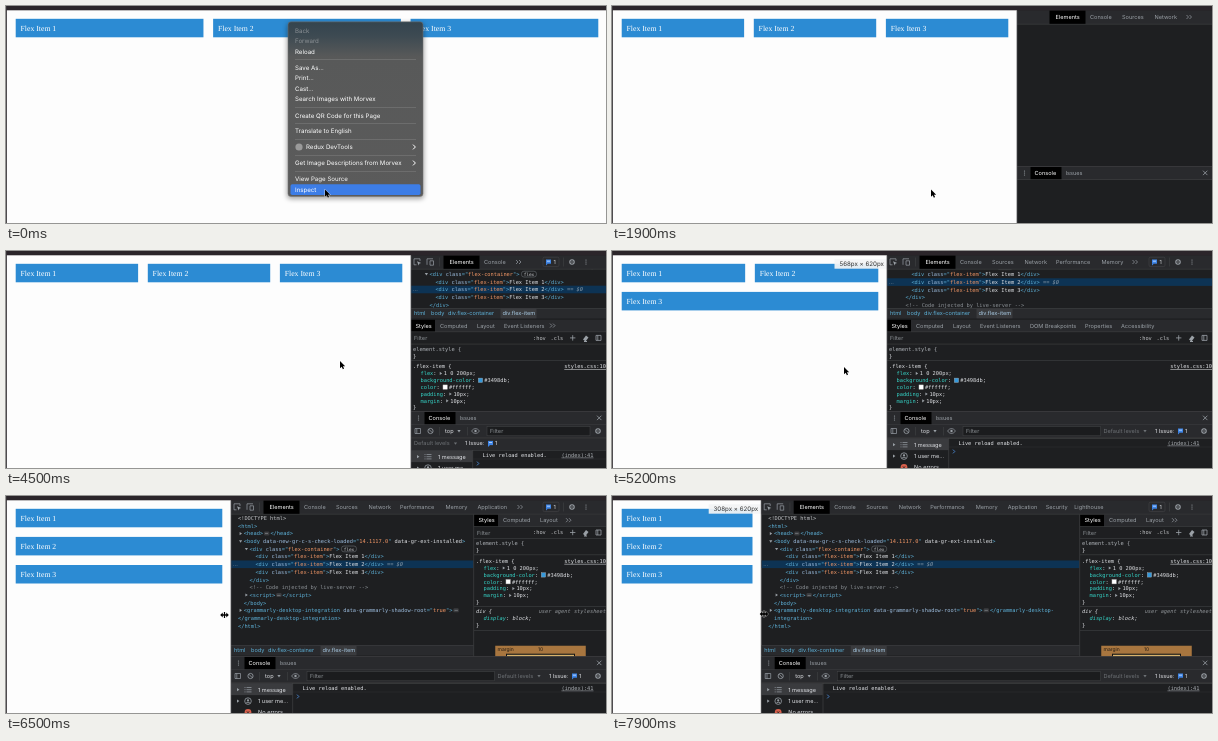
Animation of 600 by 217 pixels, one loop 8000 ms. Source, as an HTML page:

```html
<!DOCTYPE html>
<html lang="en">
<head>
<meta charset="utf-8">
<title>Flex items and developer tools</title>
<style>
html, body { margin: 0; width: 100%; height: 100%; overflow: hidden; background: #fdfdfd; }
svg { display: block; width: 100%; height: 100%; }
text { white-space: pre; text-rendering: geometricPrecision; }
.ui { font-family: Inter, Roboto, sans-serif; }
.mono { font-family: "DejaVu Sans Mono", "Liberation Mono", monospace; }
.page { font-family: "Liberation Serif", "Times New Roman", serif; }
</style>
</head>
<body>
<svg id="stage" viewBox="0 0 600 217"></svg>
<script>
const stage = document.getElementById('stage');
const LOOP = 8000, SCALE = 2.064, CHAR = 3.209;
const C = { bar: '#292a2d', body: '#1e1f21', line: '#454648', dim: '#9aa0a6', text: '#dfe1e5',
  tag: '#5db0d7', attr: '#9bbbdc', value: '#f29766', prop: '#35d4c7', blue: '#2c8bd3' };

// Drawing helpers; text is placed by its vertical centre.
const esc = s => s.replace(/&/g, '&amp;').replace(/</g, '&lt;');
const rect = (x, y, w, h, fill, more = '') =>
  `<rect x="${x}" y="${y}" width="${Math.max(0, w)}" height="${h}" fill="${fill}" ${more}/>`;
const path = (d, color, w = 0.7, more = '') =>
  `<path d="${d}" fill="none" stroke="${color}" stroke-width="${w}" ${more}/>`;
const circle = (x, y, r, fill, more = '') => `<circle cx="${x}" cy="${y}" r="${r}" fill="${fill}" ${more}/>`;
const rawText = (cls, size, x, y, inner, fill, more = '') =>
  `<text class="${cls}" x="${x}" y="${y + size * 0.35}" font-size="${size}" fill="${fill}" ${more}>${inner}</text>`;
const ui = (x, y, s, fill = C.dim, size = 5.6, more = '') => rawText('ui', size, x, y, esc(s), fill, more);
const mono = (x, y, s, fill = C.text, more = '') => rawText('mono', 5.33, x, y, esc(s), fill, more);
const clip = (id, x, y, w, h, inner) =>
  `<clipPath id="${id}"><rect x="${x}" y="${y}" width="${Math.max(0, w)}" height="${h}"/></clipPath>` +
  `<g clip-path="url(#${id})">${inner}</g>`;
const down = (x, y, c = C.dim) => `<path d="M${x - 1.6} ${y - 1}h3.2l-1.6 2.4z" fill="${c}"/>`;
const right = (x, y, c = C.dim) => `<path d="M${x - 1} ${y - 1.6}v3.2l2.4-1.6z" fill="${c}"/>`;
const more = (x, y) => [-2, 0, 2].map(d => circle(x, y + d, 0.6, C.dim)).join('');
const chevrons = (x, y) => path(`M${x} ${y - 2}l2 2l-2 2m3-4l2 2l-2 2`, C.dim);
const gear = (x, y) => circle(x, y, 2.2, 'none', `stroke="${C.dim}" stroke-width="1.1"`) + circle(x, y, 0.7, C.dim);
const bubble = (x, y) => rect(x, y - 2.5, 5, 4.2, '#3f86e8') + rect(x + 1, y - 1.2, 3, 0.6, '#fff') +
  `<path d="M${x} ${y + 1.5}v2l2-2z" fill="#3f86e8"/>`;

// Linear motion through [time, value, ...] points.
function along(keys, t) {
  if (t <= keys[0][0]) return keys[0].slice(1);
  for (let i = 1; i < keys.length; i++) {
    const [a, b] = [keys[i - 1], keys[i]];
    if (t <= b[0]) return b.slice(1).map((v, j) => a[j + 1] + (v - a[j + 1]) * (t - a[0]) / (b[0] - a[0]));
  }
  return keys[keys.length - 1].slice(1);
}

const EDGE = [[4500, 405], [5200, 275], [5600, 240], [6000, 225], [6500, 225], [7200, 171], [7400, 168], [7900, 149.2]];
const POINTER = [[2400, 319, 183.5], [3300, 403, 112], [4200, 404, 110], [4500, 334, 110], [5200, 232, 116],
  [6000, 220, 118], [6500, 218.5, 119], [7200, 170, 114], [7900, 152, 118]];

// Three wrapping flex items, basis 200px, laid out in a viewport of the given width.
function flexPage(width) {
  const pad = 4.84, left = 4.87, room = width - 3.87 - left, basis = 240 / SCALE;
  const perRow = Math.max(1, Math.min(3, Math.floor(room / basis)));
  let out = '';
  for (let i = 0; i < 3; i++) {
    const row = Math.floor(i / perRow), count = Math.min(perRow, 3 - row * perRow), w = room / count;
    const x = left + (i % perRow) * w + pad, y = 12.8 + row * 28.1;
    out += rect(x, y, w - 2 * pad, 18.5, C.blue) +
      rawText('page', 7.75, x + 4.8, y + 9.3, `Flex Item ${i + 1}`, '#fff');
  }
  return out;
}

const MENU = [['Back', 24.5, 1], ['Forward', 35, 1], ['Reload', 45.5], ['Save As...', 61.5], ['Print...', 72],
  ['Cast...', 82.5], ['Search Images with Morvex', 93], ['Create QR Code for this Page', 109.5],
  ['Translate to English', 125], ['Redux DevTools', 141], ['Get Image Descriptions from Morvex', 157],
  ['View Page Source', 173], ['Inspect', 183.5]];

function contextMenu(alpha) {
  let out = `<defs><linearGradient id="glass" x2="0" y2="1"><stop offset="0" stop-color="#34444e"/>
    <stop offset=".08" stop-color="#3d4a52"/><stop offset=".2" stop-color="#585959"/>
    <stop offset="1" stop-color="#5b5b5b"/></linearGradient>
    <filter id="soft" x="-10%" y="-10%" width="120%" height="120%"><feGaussianBlur stdDeviation="2.5"/></filter></defs>`;
  out += rect(281, 17, 137, 176, '#000', 'rx="4" opacity=".35" filter="url(#soft)"') +
    rect(282, 15.8, 135, 174.7, 'url(#glass)', 'rx="3" stroke="#777" stroke-width=".5"') +
    rect(284.5, 178.2, 130, 10.8, '#3d7de6', 'rx="1.8"');
  for (const y of [53.3, 101.2, 117.2, 133, 149, 165]) out += rect(289, y, 121, 0.6, '#7b7b7b');
  for (const [label, y, off] of MENU) {
    const icon = label === 'Redux DevTools';
    out += ui(icon ? 300 : 289, y, label, off ? '#8b9094' : '#fff', 6.15);
    if (icon) out += circle(293, y, 3.6, '#9a9a9a');
    if (icon || label.startsWith('Get')) out += path(`M407 ${y - 2.4}l2.4 2.4l-2.4 2.4`, '#fff', 1);
  }
  return `<g opacity="${alpha}">${out}</g>`;
}

const TABS = [['Elements', 38.5, 24], ['Console', 73, 23], ['Sources', 105, 23], ['Network', 137.5, 23],
  ['Performance', 169, 35], ['Memory', 214.5, 22], ['Application', 246.5, 31], ['Security', 284.5, 24],
  ['Lighthouse', 313, 30]];

function tabRow(x, y, tabs, limit, gap) {
  let out = '', end = x;
  for (const [label, dx, w] of tabs) {
    if (x + dx + w > limit) break;
    out += ui(x + dx, y, label, dx < 50 && !end0(dx, tabs) ? '#fff' : C.dim);
    end = x + dx + w;
  }
  return out + (end < limit && tabs[tabs.length - 1][1] + x + tabs[tabs.length - 1][2] > limit
    ? chevrons(end + gap, y) : '');
}
const end0 = (dx, tabs) => dx !== tabs[0][1];

function mainBar(d, ready) {
  let out = rect(d, 4.3, 600 - d, 13.5, C.bar) + rect(d, 17.8, 600 - d, 0.6, C.line) +
    rect(d + 32.5, 4.5, 36, 13.3, '#000') + tabRow(d, 11, TABS, ready ? 514 : 569, 9);
  if (!ready) return out;
  out += path(`M${d + 9} 10v-2.2h-6v6h2.5`, C.dim) +
    `<path d="M${d + 6} 10.2l4.2 1.7-1.8.7-.7 1.8z" fill="${C.dim}"/>` +
    path(`M${d + 16} 13.8v-6h6m-3 2h3.5v4.4h-3.5z`, C.dim) + rect(d + 28.5, 6.5, 0.5, 9, C.line);
  return out + rect(537, 6.2, 16, 9.4, 'none', `rx="1.5" stroke="${C.line}" stroke-width=".6"`) +
    bubble(540, 11) + ui(547.5, 11, '1', C.text) + rect(557, 6.5, 0.5, 9, C.line) + gear(566, 11) + more(580, 11);
}

// Colours one line of markup.
function markup(s) {
  const span = (c, v, m = '') => `<tspan fill="${c}" ${m}>${esc(v)}</tspan>`;
  const gap = '<tspan font-size="3.4"> </tspan>';
  const re = /(<!.*>)|( [\w-]+)="([^"]*)"|(<\/?[\w-]+|>)|(== \$0)|(⋯)|([^<>=⋯]+?(?=[<>=⋯]|$))/g;
  return [...s.matchAll(re)].map(([, note, attr, val, tag, ref, dots, txt]) =>
    note ? span(note.startsWith('<!--') ? '#8a8f94' : '#c3c5c8', note) :
    attr ? span(C.attr, attr) + span(C.tag, '="') + span(C.value, val) + span(C.tag, '"') :
    tag ? span(C.tag, tag) : ref ? span('#8a9cab', ref, 'font-style="italic"') :
    dots ? gap + span('#a5a8ab', dots) + gap : span(C.text, txt)).join('');
}

function domTree(d, side) {
  const item = n => `<div class="flex-item">Flex Item ${n}</div>`;
  const shadow = '<grammarly-desktop-integration data-grammarly-shadow-root="true">⋯';
  const late = d < 195;
  const rows = [[0, '<!DOCTYPE html>'], [0, '<html>'], [1, '<head>⋯</head>', right],
    [1, '<body data-new-gr-c-s-check-loaded="14.1117.0" data-gr-ext-installed>', down],
    [2, '<div class="flex-container">', down], [3, item(1)], [3, item(2) + ' == $0'], [3, item(3)],
    [2, '</div>'], [2, '<!-- Code injected by live-server -->'], [2, '<script>⋯<\/script>', right], [1, '</body>'],
    [1, shadow + (late ? '</grammarly-desktop-' : ''), right],
    [late ? 1 : 0, late ? 'integration>' : '</grammarly-desktop-integration>'], [0, '</html>']];
  const scroll = side ? 0 : d > 340 ? 29.8 : 37.2;
  const width = (side ? 467.5 : 600) - d;
  const lines = rows.map(([depth, s, arrow], i) => {
    const x = d + 7 + depth * 5.8, y = 22.2 + i * 7.68 - scroll;
    let out = i === 6 ? rect(d, y - 3.8, width, 7.6, '#0d3354') + ui(d + 2, y - 0.5, '…', C.dim) : '';
    if (arrow) out += arrow(x - 3.2, y);
    const dots = s.indexOf('⋯');
    if (dots > 0) out += rect(x + dots * CHAR + 1, y - 2, 5.3, 4, '#3b3c3f', 'rx="1.2"');
    out += rawText('mono', 5.33, x, y, s === 'integration>' ? esc(s) : markup(s), C.tag);
    if (i === 4) {
      const bx = x + 28 * CHAR + 2;
      out += rect(bx, y - 2.9, 15, 5.8, 'none', 'rx="2.5" stroke="#6b7075" stroke-width=".6"') +
        mono(bx + 2.2, y, 'flex', '#c8cacd', 'style="font-size:4.4px"');
    }
    return out;
  }).join('');
  const by = side ? 154.3 : 62.2;
  return clip('tree', d, 18.4, width, side ? 131 : 38.6, lines) +
    rect(d, by - 5, width, 10.2, C.bar) + rect(d, by - 5.2, width, 0.5, C.line) +
    rect(d + 89.5, by - 4.7, 36, 9.8, '#3a3b3e') +
    ui(d + 3, by, 'html', C.tag) + ui(d + 20, by, 'body', C.tag) +
    ui(d + 37, by, 'div.flex-container', C.tag) + ui(d + 91.5, by, 'div.flex-item', '#a9cbe4');
}

const STYLE_TABS = [['Styles', 4.5, 16], ['Computed', 29, 27], ['Layout', 66, 19], ['Event Listeners', 93, 39],
  ['DOM Breakpoints', 143, 46], ['Properties', 198, 27], ['Accessibility', 234, 32]];

function stylesPane(p, side) {
  const o = side ? 0 : 50.4, w = 600 - p;
  const rule = (y, name, value, swatch, arrow) => {
    const vx = p + 9.5 + (name.length + 2) * CHAR;
    return mono(p + 9.5, y, name, C.prop) + mono(p + 9.5 + name.length * CHAR, y, ':') +
      (swatch ? rect(vx, y - 2.2, 4.4, 4.4, swatch, 'stroke="#aaa" stroke-width=".4"') : '') +
      (arrow ? right(vx + 1, y) : '') + mono(vx + (swatch ? 6 : arrow ? 4 : 0), y, value + ';');
  };
  const end = 'text-anchor="end"';
  let out = rect(p, 18.4 + o, w, 12, C.bar) + rect(p, 18.4 + o, 24, 12, '#000') +
    tabRow(p, 24.2 + o, STYLE_TABS, 560, 7) +
    rect(p, 30.2 + o, w, 0.5, C.line) + ui(p + 3, 36.6 + o, 'Filter', '#8b9094') +
    mono(527, 36.6 + o, ':hov', '#c3c5c8') + mono(544.5, 36.6 + o, '.cls', '#c3c5c8') +
    path(`M564 ${36.5 + o}h5.4m-2.7-2.7v5.4M590 ${34 + o}h5v5h-5zm1.8 0v5`, C.dim, 0.8) +
    `<path d="M577 ${38 + o}l3-4 2.5 2-3 4zM578 ${39.5 + o}h3v1h-3z" fill="${C.dim}"/>` +
    rect(p, 42.4 + o, w, 0.5, C.line);
  const css = y => y + o;
  out += mono(p + 2, css(47.3), 'element.style {', '#aeb2b7') + mono(p + 2, css(54.3), '}') +
    rect(p, css(58.6), w, 0.5, C.line) + mono(p + 2, css(65), '.flex-item {') +
    mono(600, css(65), 'styles.css:10', C.text, end + ' text-decoration="underline"') +
    rule(css(72), 'flex', '1 0 200px', '', 1) + rule(css(78.9), 'background-color', '#3498db', '#3498db') +
    rule(css(85.7), 'color', '#ffffff', '#ffffff') + rule(css(92.6), 'padding', '10px', '', 1) +
    rule(css(99.4), 'margin', '10px', '', 1) + mono(p + 2, css(106.2), '}') + rect(p, css(110), w, 0.5, C.line);
  if (side) {
    out += mono(p + 2, 115.5, 'div {', C.text, 'font-style="italic"') +
      mono(600, 115.5, 'user agent stylesheet', '#8f9397', 'font-style="italic" text-anchor="end"') +
      `<g font-style="italic">${rule(122.4, 'display', 'block')}</g>` + mono(p + 2, 129.4, '}') +
      rect(p, 134, w, 0.5, C.line) + rect(489, 149.5, 91, 14, '#a8763f', 'stroke="#222" stroke-width=".5"') +
      ui(491.5, 153.7, 'margin', '#211a12', 5) + ui(532, 153.7, '10', '#211a12', 5) +
      rect(500, 157.7, 69, 5, '#151515') + rect(501, 158.8, 67, 4, '#d8b36b');
  }
  return clip('rules', p, 18.4, w, 142, out) + (side ? rect(p - 0.5, 18.4, 0.6, 142, C.line) : '');
}

function drawer(d, ready) {
  const w = 600 - d, tall = d > 340;
  let out = rect(d, 160.6, w, 56.4, C.body) + rect(d, 160.6, w, 12.6, C.bar) + rect(d, 160.3, w, 0.6, C.line) +
    rect(d, 173.2, w, 0.6, C.line) + rect(d + 13.5, 161, 31, 12.2, '#000') + more(d + 7.5, 167) +
    ui(d + 17.5, 167, 'Console', '#fff') + ui(d + 48.5, 167, 'Issues') +
    path('M591 164.7l4.4 4.4m0-4.4l-4.4 4.4', C.dim, 0.8);
  if (!ready) return out;
  const y = 180, ly = tall ? 192.4 : y, lx = tall ? d + 3 : 491.5, ix = tall ? d + 54 : 543;
  const top = tall ? 199 : 187, msg = top + 4.8;
  out += rect(d, 173.8, w, top - 173.8, C.bar) + rect(d, 186.7, w, 0.5, C.line) + rect(d, top, w, 0.5, C.line) +
    path(`M${d + 4} 177.5h5.5v5h-5.5zm1.8 0v5`, C.dim) +
    circle(d + 19.5, y, 2.6, 'none', `stroke="${C.dim}" stroke-width=".8"`) +
    path(`M${d + 17.8} 178.2l3.5 3.5`, C.dim, 0.8) + rect(d + 28, 176, 0.5, 8.5, C.line) +
    ui(d + 34, y, 'top', C.text) + down(d + 48, y) + rect(d + 56, 176, 0.5, 8.5, C.line) +
    path(`M${d + 60.5} 180q4-5 8 0q-4 5-8 0z`, C.dim) + circle(d + 64.5, y, 1.2, C.dim) +
    rect(d + 76, 175.6, (tall ? 584 : 488.5) - d - 76, 9.2, '#1b1c1e', `stroke="${C.line}" stroke-width=".5"`) +
    ui(d + 79, y, 'Filter', '#8b9094') + ui(lx, ly, 'Default levels', '#6d7175') + down(lx + 41.5, ly, '#6d7175') +
    ui(ix, ly, '1 Issue:', C.text) + bubble(ix + 23, ly) + ui(ix + 30, ly, '1', C.text) + gear(592, y);
  const rowY = top + 6.7;
  const names = ['1 message', '1 user me…', 'No errors'];
  out += rect(d, top + 0.5, 61.5, 11.6, '#3a3b3e');
  names.forEach((name, i) => {
    const ry = rowY + i * 11.4, cx = d + 17;
    out += ui(d + 27, ry, name, C.text) + (i < 2 ? right(d + 7, ry) : '') +
      (i === 0 ? path(`M${cx - 1.5} ${ry - 2.2}h5m-5 2.2h5m-5 2.2h5M${cx - 3.5} ${ry - 2.2}h1m-1 2.2h1m-1 2.2h1`, C.dim) :
       i === 1 ? circle(cx, ry, 3.3, 'none', `stroke="${C.dim}" stroke-width=".8"`) + circle(cx, ry - 0.8, 1.1, C.dim) +
         path(`M${cx - 1.8} ${ry + 1.8}q1.8-1.7 3.6 0`, C.dim, 0.9) :
       circle(cx, ry, 3.4, '#d9604c') + path(`M${cx - 1.2} ${ry - 1.2}l2.4 2.4m0-2.4l-2.4 2.4`, '#222', 0.8));
  });
  return out + rect(d + 61.5, top, 0.6, 217 - top, C.line) + mono(d + 71.5, msg, 'Live reload enabled.') +
    mono(587.5, msg, '(index):41', '#a9adb2', 'text-anchor="end" text-decoration="underline"') +
    rect(d + 62, msg + 4, w - 62, 0.4, '#35363a') +
    path(`M${d + 66} ${msg + 6.8}l1.8 1.9l-1.8 1.9`, '#4f94e6', 0.8);
}

function devtools(d, t) {
  const side = d < 245, tree = t >= 2100, ready = t >= 2000;
  return rect(d, 4, 600 - d, 213, C.body) +
    (tree ? domTree(d, side) + stylesPane(side ? 468 : d, side) : '') +
    mainBar(d, ready) + drawer(d, tree) + rect(d - 0.4, 4.3, 0.7, 213, '#5a5b5d');
}

function pointer(t) {
  const [x, y] = along(POINTER, t);
  const resize = (t >= 3300 && t < 4300) || t >= 5700;
  const shape = resize
    ? 'M-4.3 0l2.5-2.4v1.6h1.2v-2.2h1.2v2.2h1.2v-1.6l2.5 2.4-2.5 2.4v-1.6h-1.2v2.2h-1.2v-2.2h-1.2v1.6z'
    : 'M0 0v7.2l1.7-1.5 1.2 2.5 1.2-.6-1.2-2.4h2.3z';
  return `<path transform="translate(${x} ${y})" d="${shape}" fill="#000" stroke="#fff" stroke-width=".7" paint-order="stroke"/>`;
}

function sizeLabel(d, t) {
  if (t < 4600 || (t >= 6000 && t < 6600)) return '';
  return rect(d - 52.5, 8.3, 52.2, 9.4, '#f4f5f6', 'opacity=".93"') +
    ui(d - 3, 13, `${Math.round(d * SCALE)}px × 620px`, '#333', 6.2, 'text-anchor="end"');
}

function draw(t) {
  const [d] = along(EDGE, t);
  stage.innerHTML = rect(0, 0, 600, 217, '#fdfdfd') + flexPage(t < 1000 ? 601 : d) +
    (t >= 1900 ? sizeLabel(d, t) + devtools(d, t) : '') +
    rect(0, 0, 600, 4.3, '#2b252a') + rect(0, 0, 0.9, 217, '#3b383b') +
    (t < 800 ? contextMenu(1 - t / 800) : '') + pointer(t);
}

const start = performance.now();
let shown = -1;
function tick() {
  const t = Math.floor((performance.now() - start) % LOOP / 100) * 100;
  if (t !== shown) draw(shown = t);
  requestAnimationFrame(tick);
}
tick();
</script>
</body>
</html>
```
